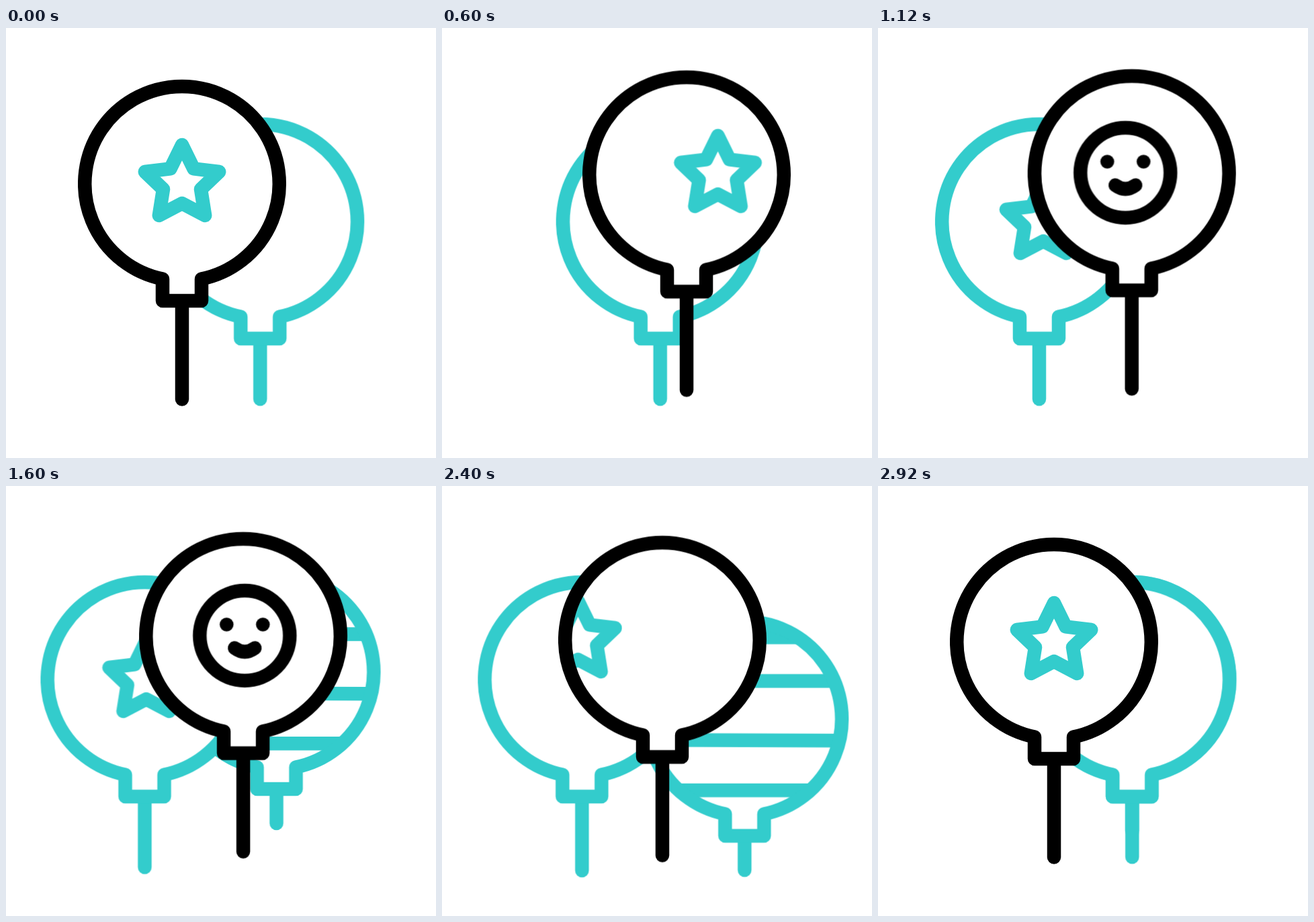
Write an HTML page that moves like this. It is 640 px wide and 640 px high and loops after 3000 ms.

```html
<!DOCTYPE html>
<html lang="en">
<head>
<meta charset="utf-8">
<title>Balloons</title>
<style>
  html, body { margin: 0; width: 100%; height: 100%; overflow: hidden; background: #fff; }
  svg { display: block; width: 100%; height: 100%; }
  .line { fill: none; stroke: currentColor; stroke-width: 20.5; stroke-linecap: round; stroke-linejoin: round; }
  .fill { fill: #fff; }
  .dot { fill: currentColor; }
  .teal { color: #3cc; }
  .black { color: #000; }

  .move { animation: 3s cubic-bezier(.333, 0, .667, 1) infinite; }
  .front { animation-name: front; }
  .left { animation-name: left; }
  .cord { animation-name: cord; }
  .right-x { animation-name: right-x; }
  .right-y { animation-name: right-y; }
  .front-star { animation-name: front-star; }
  .left-star { animation-name: left-star; }
  .face { animation-name: face; }

  @keyframes front {
    0%, 4% { transform: translate(262px, 232px); }
    24.4%, 42% { transform: translate(377.7px, 216.5px); }
    62.7%, 76% { transform: translate(334.8px, 229px); }
    97.33%, 100% { transform: translate(262px, 232px); }
  }
  @keyframes left {
    0%, 5.87% { transform: translate(378.3px, 288.2px); }
    39.5% { transform: translate(238.3px, 288.2px); }
    42.87% { transform: translate(238.3px, 288.2px); animation-timing-function: cubic-bezier(.333, .667, .667, 1); }
    66.53%, 76.2% { transform: translate(192.2px, 288.2px); }
    97.33%, 100% { transform: translate(378.3px, 288.2px); }
  }
  @keyframes cord {
    0% { transform: translateY(0); }
    42.87% { transform: translateY(0); animation-timing-function: cubic-bezier(.333, .667, .667, 1); }
    66.53%, 76.2% { transform: translateY(22px); }
    97.33%, 100% { transform: translateY(0); }
  }
  @keyframes right-x {
    0%, 43% { transform: translateX(378px); visibility: hidden; }
    43.87% { transform: translateX(378px); visibility: visible; animation-timing-function: cubic-bezier(.53, 0, .667, 1); }
    64%, 78.33% { transform: translateX(452px); visibility: visible; }
    97.33% { transform: translateX(378.3px); visibility: visible; }
    97.4%, 100% { transform: translateX(378.3px); visibility: hidden; }
  }
  @keyframes right-y {
    0%, 43.87% { transform: translateY(217px); }
    64%, 78.33% { transform: translateY(348px); }
    97.33%, 100% { transform: translateY(288.2px); }
  }
  @keyframes front-star {
    0%, 13.87% { transform: translateX(0); }
    35.2% { transform: translateX(230px); animation-timing-function: step-end; }
    36%, 70.77% { transform: translateX(-210px); }
    92.1%, 100% { transform: translateX(0); }
  }
  @keyframes left-star {
    0%, 17.77% { transform: translateX(210px); }
    39.1%, 62.7% { transform: translateX(2.2px); }
    79%, 100% { transform: translateX(-210px); }
  }
  @keyframes face {
    0%, 18.93% { transform: translateX(-230px); }
    40.27%, 62.7% { transform: translateX(2.2px); }
    79%, 100% { transform: translateX(230px); }
  }
</style>
</head>
<body>
<svg viewBox="0 0 640 640">
  <defs>
    <path id="body" d="M-29 141.5A144.75 144.75 0 1 1 29 141.5V174H-29Z"/>
    <path id="star" d="M0-58 17.3-22.7 55.2-18 28 8 34.2 47 0 29-34.2 47-28 8-55.2-18-17.3-22.7Z"/>
    <clipPath id="inside"><circle r="140"/></clipPath>
  </defs>

  <g class="teal move right-x">
    <g class="move right-y">
      <path class="line" d="M0 140V225"/>
      <use href="#body" class="fill"/>
      <g clip-path="url(#inside)">
        <path class="line" d="M-79-121.5H79M-133-56.5H133M-141 31.3 141 32.3M-98 106.3H98"/>
      </g>
      <use href="#body" class="line"/>
    </g>
  </g>

  <g class="teal move left">
    <path class="line move cord" d="M0 140V264"/>
    <use href="#body" class="fill"/>
    <g clip-path="url(#inside)">
      <use href="#star" class="line move left-star"/>
    </g>
    <use href="#body" class="line"/>
  </g>

  <g class="black move front">
    <path class="line" d="M0 140V320.5"/>
    <use href="#body" class="fill"/>
    <g clip-path="url(#inside)">
      <g class="teal"><use href="#star" class="line move front-star"/></g>
      <g class="move face">
        <circle class="line" cy="-1" r="67"/>
        <circle class="dot" cx="-27" cy="-17.5" r="10.3"/>
        <circle class="dot" cx="27" cy="-17.5" r="10.3"/>
        <path class="line" d="M-15 17.5Q0 28.5 15 17.5"/>
      </g>
    </g>
    <use href="#body" class="line"/>
  </g>
</svg>
</body>
</html>
```
